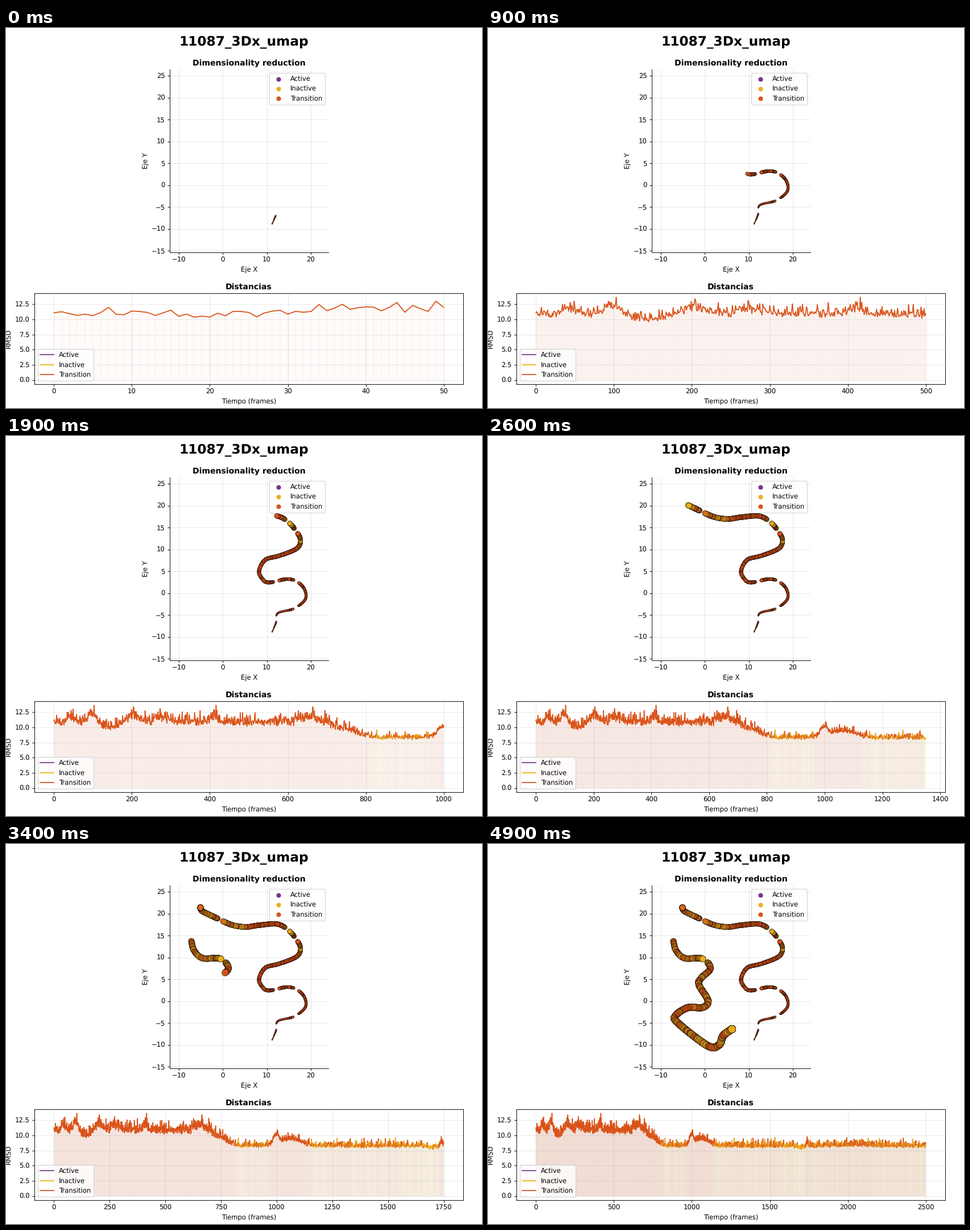
Animation, 837 px wide and 669 px high, one loop 5000 ms. Source, as a matplotlib script:

```python
import numpy as np
import matplotlib.pyplot as plt
from matplotlib.animation import FuncAnimation
from matplotlib.collections import LineCollection, PolyCollection
from matplotlib.colors import to_rgba

W, H, DPI = 837, 669, 83.7
FRAMES, STEP = 50, 50
TOTAL = FRAMES * STEP
COLORS = {"Active": "#7E2F8E", "Inactive": "#EDB120", "Transition": "#D95319"}
INACTIVE_BELOW = 8.4
JUMP = 1471       # time at which the embedding leaps to its second stroke
SPEED = 0.37      # pixels travelled along the path per time step

# Key points of the two strokes, in stage pixels
FIRST_STROKE = [
    (468, 345), (475, 328), (478, 312), (506, 304), (526, 288), (525, 270),
    (511, 256), (493, 252), (463, 258), (452, 253), (445, 238), (456, 218),
    (480, 211), (510, 199), (518, 185), (512, 170), (497, 152), (477, 141),
    (445, 143), (422, 146), (396, 142), (363, 127), (345, 118), (342, 112),
]
SECOND_STROKE = [
    (326, 171), (331, 188), (346, 201), (377, 202), (391, 219), (375, 236),
    (371, 248), (387, 276), (377, 288), (352, 288), (330, 302), (334, 315),
    (386, 355), (406, 354), (414, 337), (429, 326),
]
GAP_TIMES = [68, 187, 351, 450, 882, 943, 1275, 1676]

# Rises and dips of the distance: (time, width, height)
BUMPS = [
    (40, 8, 0.9), (98, 8, 1.5), (145, 16, -0.9), (208, 14, 1.0),
    (272, 14, 0.8), (410, 9, 0.9), (655, 20, 0.7), (998, 14, 1.5),
    (1065, 40, 1.2), (1710, 25, -0.3), (1738, 7, 0.7), (2060, 90, 0.2),
]

plt.rcParams["font.family"] = "DejaVu Sans"
plt.rcParams["text.hinting"] = "none"
rng = np.random.default_rng(7)


def smoothstep(x, start, end):
    u = np.clip((x - start) / (end - start), 0, 1)
    return u * u * (3 - 2 * u)


def trace(stroke, travelled):
    """Points at given distances along a Catmull-Rom curve."""
    points = np.pad(np.array(stroke, float), ((1, 1), (0, 0)), mode="edge")
    u = np.linspace(0, len(stroke) - 1, 1500)
    i = np.minimum(u.astype(int), len(stroke) - 2)
    f = (u - i)[:, None]
    a, b, c, d = (points[i + k] for k in range(4))
    curve = b + 0.5 * f * (c - a + f * (2 * a - 5 * b + 4 * c - d
                                        + f * (3 * (b - c) + d - a)))
    steps = np.hypot(*np.diff(curve, axis=0).T)
    length = np.concatenate([[0], np.cumsum(steps)])
    return np.column_stack([np.interp(travelled, length, axis)
                            for axis in curve.T])


def open_gaps(times, half_width=14):
    """Push times away from each gap, squeezing their neighbours."""
    for gap in GAP_TIMES:
        offset = times - gap
        pushed = gap + np.sign(offset) * (half_width + np.abs(offset) * 2 / 3)
        times = np.where(np.abs(offset) < 3 * half_width, pushed, times)
    return times


def make_positions():
    shaken = open_gaps(time + rng.normal(0, 4, time.size))
    first = time < JUMP
    pixels = np.vstack([trace(FIRST_STROKE, SPEED * shaken[first]),
                        trace(SECOND_STROKE, SPEED * (shaken[~first] - JUMP))])
    pixels += rng.normal(0, 0.12, pixels.shape)
    return np.column_stack([(pixels[:, 0] - 381.4) / 7.715,
                            (276.6 - pixels[:, 1]) / 7.7])


def make_distances():
    settled = smoothstep(time, 660, 850)
    level = 11.15 - 2.73 * settled
    for center, width, height in BUMPS:
        level += height * np.exp(-((time - center) / width) ** 2 / 2)
    noise = rng.normal(size=time.size)
    noise += 0.15 * (noise ** 2 - 1)
    return np.clip(level + (0.55 - 0.27 * settled) * noise, 6.9, 13.6)


def place_axes(left, top, right, bottom):
    return fig.add_axes([left / W, 1 - bottom / H,
                         (right - left) / W, (bottom - top) / H])


def label_axes(ax, title, xlabel, ylabel):
    ax.set_title(title, fontsize=12, fontweight="bold")
    ax.set_xlabel(xlabel)
    ax.set_ylabel(ylabel)
    ax.grid(alpha=0.3)


def state_colors(alpha):
    return np.array([to_rgba(COLORS[s], alpha) for s in state])


time = np.arange(TOTAL + 1)
distance = make_distances()
position = make_positions()
dot_size = 0.8 + 0.051 * time
state = np.where(distance < INACTIVE_BELOW, "Inactive", "Transition")

fig = plt.figure(figsize=(10, (H + 0.01) / DPI), dpi=DPI, facecolor="white")
fig.suptitle("11087_3Dx_umap", fontsize=20, fontweight="bold")

map_ax = place_axes(288, 73, 567, 395)
label_axes(map_ax, "Dimensionality reduction", "Eje X", "Eje Y")
map_ax.spines[["top", "right"]].set_visible(False)
for name, color in COLORS.items():
    map_ax.scatter([], [], color=color, label=name)
map_ax.legend(loc="upper right")
dots = map_ax.scatter([], [], linewidths=0.5, zorder=2)
dots.set_facecolor(state_colors(0.65))
dots.set_edgecolor((0, 0, 0, 0.55))
map_ax.set(xlim=(-12.1, 24.06), ylim=(-15.38, 26.44),
           xticks=range(-10, 21, 10), yticks=range(-15, 26, 5))

line_ax = place_axes(50, 467, 804, 627)
label_axes(line_ax, "Distancias", "Tiempo (frames)", "RMSD")
for name, color in COLORS.items():
    line_ax.plot([], [], color=color, label=name)
line_ax.legend(loc="lower left")
line_ax.set(ylim=(-0.68, 14.28), yticks=np.arange(0, 13, 2.5))

curve = np.column_stack([time, distance])
base = np.column_stack([time, 0 * distance])
segments = np.stack([curve[:-1], curve[1:]], axis=1)
slices = np.stack([base[:-1], curve[:-1], curve[1:], base[1:]], axis=1)

# Thin translucent slices overlap, so the area deepens as time is compressed
tint = state_colors(0.021)[1:]
area = PolyCollection([], facecolors=tint, edgecolors=tint, linewidths=1.5,
                      zorder=1)
trail = LineCollection([], colors=state_colors(1)[1:], linewidths=1.5,
                       capstyle="round", zorder=2)
line_ax.add_collection(area, autolim=False)
line_ax.add_collection(trail, autolim=False)


def update(frame):
    last = STEP * (frame + 1)
    dots.set_offsets(position[:last + 1])
    dots.set_sizes(dot_size[:last + 1])
    area.set_verts(slices[:last])
    trail.set_segments(segments[:last])
    line_ax.set_xlim(-0.05 * last, 1.05 * last)
    return dots, area, trail


animation = FuncAnimation(fig, update, frames=FRAMES, interval=100,
                          repeat=True, repeat_delay=0, blit=False)
plt.show()
```
